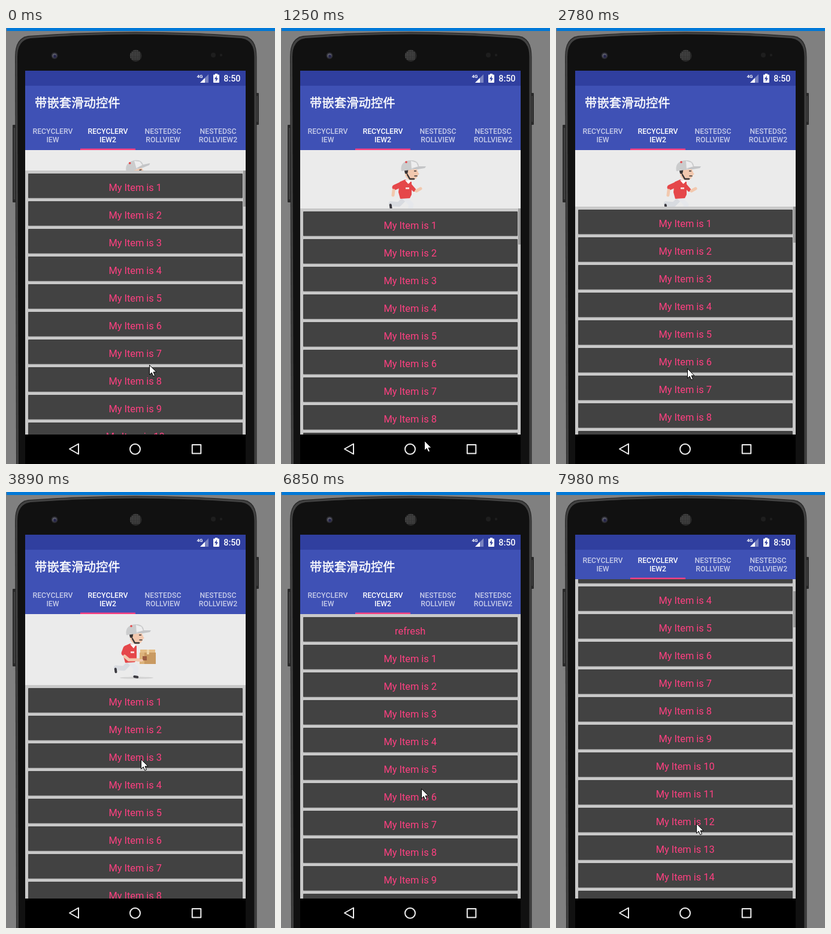
An HTML page with a canvas that plays this animation: 449x725 px, repeating every 8000 ms.

```html
<!DOCTYPE html>
<html lang="zh">
<head>
<meta charset="utf-8">
<title>Pull to refresh</title>
<style>
html, body { margin: 0; width: 100%; height: 100%; overflow: hidden; background: #808080; }
canvas { display: block; }
</style>
</head>
<body>
<canvas id="stage" width="449" height="725"></canvas>
<script>
const g = document.getElementById('stage').getContext('2d');
const LOOP = 8000, TICK = 137.2, LEAD = 29;
const LEFT = 32, WIDTH = 368, MID = 216, BAR = 96, NAV = 676, PITCH = 46;
const PINK = '#ff4081', INDIGO = '#3f51b5', SKIN = '#f2c8ae', RED = '#e5474a';
const SANS = 'Roboto, "Noto Sans", sans-serif';

// Progress of step n between a and b: linear, smooth and slowing down
const ramp = (n, a, b) => Math.min(1, Math.max(0, (n - a) / (b - a)));
const glide = (n, a, b) => { const u = ramp(n, a, b); return u * u * (3 - 2 * u); };
const settle = (n, a, b) => 1 - (1 - ramp(n, a, b)) ** 2;

// Two pulls, a refresh, then a swipe that folds the bar and flings the list
function pose(n) {
  const first = 126 * ramp(n, 0, 8.4), second = 248 * ramp(n, 15.3, 21.5);
  return {
    x: 239 - 20 * glide(n, 9, 13) + 6 * glide(n, 22, 25) + 7 * glide(n, 28, 32) + 2 * glide(n, 40, 50),
    y: 560 + first - 308 * glide(n, 9, 13) + second - 182 * glide(n, 22, 25) + 49 * glide(n, 40, 50)
      + 110 * glide(n, 50, 51.2) - 150 * ramp(n, 51.2, 53.5) + 98 * glide(n, 54, 58),
    pull: (34 + first / 2) * (1 - settle(n, 9, 12.5))
      + (second / 2 - 6 * glide(n, 22, 23.5)) * (1 - settle(n, 37.4, 41)),
    fold: 58 * ramp(n, 51.2, 52.5),
    scroll: 177 * settle(n, 52.5, 58),
    thumb: 1 - ramp(n, 22, 25) + ramp(n, 51, 52),
    running: n > 21 && n < 41,
    refreshed: n > 37
  };
}

function rect(x, y, w, h, color) {
  g.fillStyle = color;
  g.fillRect(x, y, w, h);
}

function round(x, y, w, h, r, color) {
  g.fillStyle = color;
  g.beginPath();
  g.roundRect(x, y, w, h, r);
  g.fill();
}

function disc(x, y, rx, color, ry = rx) {
  g.fillStyle = color;
  g.beginPath();
  g.ellipse(x, y, rx, ry, 0, 0, 7);
  g.fill();
}

function trace(pts) {
  g.beginPath();
  for (let i = 0; i < pts.length; i += 2) g.lineTo(pts[i], pts[i + 1]);
}

function poly(color, ...pts) {
  trace(pts);
  g.closePath();
  g.fillStyle = color;
  g.fill();
}

function limb(color, width, ...pts) {
  trace(pts);
  g.strokeStyle = color;
  g.lineWidth = width;
  g.lineCap = g.lineJoin = 'round';
  g.stroke();
}

function text(s, x, y, font, color, align = 'center') {
  g.font = font;
  g.fillStyle = color;
  g.textAlign = align;
  g.fillText(s, x, y);
}

function clipped(y, h, paint) {
  g.save();
  g.beginPath();
  g.rect(LEFT, y, WIDTH, h);
  g.clip();
  paint();
  g.restore();
}

function shell(inset, color) {
  const l = 15 + inset, r = 418.5 - inset, top = 7 + inset;
  g.beginPath();
  g.moveTo(l + 2, 740);
  g.lineTo(l, 48);
  g.quadraticCurveTo(l, top + 9, l + 22, top + 6);
  g.quadraticCurveTo(MID, top - 7, r - 22, top + 6);
  g.quadraticCurveTo(r, top + 9, r, 48);
  g.lineTo(r, 740);
  g.closePath();
  g.fillStyle = color;
  g.fill();
}

function sideKey(x, y, h) {
  round(x, y, 6, h, 1, '#292929');
  rect(x + 2, y + 5, 2, h - 10, '#444');
}

function phone() {
  rect(0, 0, 449, 725, '#808080');
  rect(1, 0, 448, 5, '#0078d7');
  sideKey(11, 161, 129);
  sideKey(416, 108, 53);
  shell(0, '#2a2a2a');
  shell(1.2, '#424242');
  shell(4, '#111');
  disc(81, 46, 5.5, '#2c2c32');
  disc(81, 46, 3.6, '#5c5d6a');
  disc(81.5, 47, 2.5, '#25254a');
  disc(216.5, 46, 10, '#2b2b2b');
  for (let y = -8; y <= 8; y += 2.7)
    for (let x = -8; x <= 8; x += 2.7)
      if (Math.hypot(x, y) < 9.3) disc(216.5 + x, 46 + y, 0.8, '#6a6a6a');
  disc(346, 45, 4, '#1e1e1e');
  disc(359, 45, 2.2, '#1e1e1e');
}

function statusBar() {
  rect(LEFT, 71, WIDTH, 25, '#303f9f');
  text('4G', 323.5, 83, `700 8px ${SANS}`, '#fff');
  poly('rgba(255,255,255,.35)', 324, 91, 338, 91, 338, 77);
  poly('#fff', 324, 91, 332, 91, 332, 83);
  round(346, 77.5, 10, 13.5, 1, '#fff');
  rect(349, 76, 4, 2, '#fff');
  poly('#303f9f', 352, 79, 348, 85, 350.5, 85, 350, 89.5, 354, 83.5, 351.5, 83.5);
  text('8:50', 391.5, 89, `500 14.3px ${SANS}`, '#fff', 'right');
}

function appBar(fold) {
  const title = '带嵌套滑动控件', y = 132 - fold;
  rect(LEFT, BAR, WIDTH, 107 - fold, INDIGO);
  text(title, 48, y, '500 20.4px "Noto Sans CJK SC", "Noto Sans CJK", sans-serif', '#fff', 'left');
  g.strokeStyle = '#fff';
  g.lineWidth = 0.45;
  g.strokeText(title, 48, y);
  rect(LEFT, 154 - fold, WIDTH, 49, INDIGO);
  ['RECYCLERV IEW', 'RECYCLERV IEW2', 'NESTEDSC ROLLVIEW', 'NESTEDSC ROLLVIEW2'].forEach((tab, i) =>
    tab.split(' ').forEach((s, j) =>
      text(s, 78 + 92 * i, 175.5 + 14 * j - fold, `500 12.27px ${SANS}`,
        i === 1 ? '#fff' : 'rgba(255,255,255,.7)')));
  rect(124, 200.5 - fold, 92, 2.5, PINK);
}

function head(tilt) {
  g.save();
  g.translate(216, 235);
  g.rotate(tilt);
  disc(2, 7, 11, SKIN, 11);
  poly(SKIN, 11, 3, 15, 8, 11, 10);
  poly('#393536', -11, -2, -3, -2, -5, 8, -9, 7);
  limb('#393536', 2.5, -5, 9, -1, 16, 6, 16);
  limb('#393536', 1.5, 7, 11, 11, 11);
  rect(6, 2, 4, 1.5, '#393536');
  g.fillStyle = '#cbcccd';
  g.beginPath();
  g.moveTo(-15, 3);
  g.bezierCurveTo(-18, -10, -8, -15, 1, -15);
  g.bezierCurveTo(13, -15, 15, -7, 14, -1);
  g.closePath();
  g.fill();
  poly('#ededee', 1, -14, 10, -11, 14, -2, 2, 0);
  poly('#c4c5c7', 0, -1, 14, -5, 26, -5, 24, -2, 12, 0);
  disc(-7, -12, 1.8, RED);
  g.restore();
}

function leg(phase, color) {
  const s = Math.cos(phase), thigh = 0.55 * s, shin = 0.75 * s - 0.9;
  const kx = 207 + 4 * s + 12 * Math.sin(thigh), ky = 283 + 12 * Math.cos(thigh);
  const fx = kx + 13 * Math.sin(shin), fy = ky + 12 * Math.cos(shin);
  limb(color, 8, 207, 283, kx, ky, fx, fy);
  limb('#3b3a40', 4, fx - 1, fy + 2, fx + 4 * Math.cos(shin), fy + 2 - 5 * Math.sin(shin));
}

function runner(step, running, tilt) {
  const phase = running ? step * Math.PI / 2 : 0, lift = Math.abs(Math.sin(phase));
  disc(218, 309, 28 - 4 * lift, '#d2d2d2', 1.7);
  g.save();
  g.translate(0, -4 * lift);
  leg(phase + Math.PI, '#d8dbe0');
  leg(phase, '#e6e8ec');
  poly(RED, 198, 256, 207, 252, 218, 256, 218, 277, 215, 283, 199, 284, 196, 273);
  poly('#fff', 207, 253, 217, 254, 213, 260);
  rect(208, 265, 6, 3, '#f7d6d4');
  if (running) {
    limb(RED, 9, 200, 260, 197, 268);
    limb(SKIN, 5, 198, 273, 205, 279, 224, 279);
    rect(224, 262, 25, 6, '#e5bd86');
    rect(223, 267, 27, 19, '#c99a62');
    rect(223, 267, 8, 19, '#dcb27a');
    rect(235, 262, 4, 8, '#f0d6a9');
    rect(228, 273, 7, 7, '#9c5b40');
    limb(SKIN, 4, 220, 280, 227, 280);
  } else {
    limb(RED, 9, 201, 260, 190, 265);
    limb(SKIN, 5, 188, 270, 187, 278);
    limb(RED, 6, 215, 261, 222, 269);
    limb(SKIN, 5, 226, 271, 233, 267);
  }
  head(tilt);
  g.restore();
}

function list(top, p) {
  rect(LEFT, top, WIDTH, NAV - top, '#c9c9c9');
  for (let i = 0; i < 20; i++) {
    const y = top + 5 + PITCH * i - p.scroll, n = p.refreshed ? i : i + 1;
    round(37, y + 1, 358, 40.7, 1, '#b0b0b0');
    round(37, y, 358, 40.7, 1, '#424242');
    text(n ? 'My Item is ' + n : 'refresh', 215.7, y + 29, `400 16.36px ${SANS}`, PINK);
  }
  g.globalAlpha = p.thumb;
  rect(396, top + p.scroll * 0.113, 4, 60, '#979797');
}

function navBar() {
  rect(LEFT, NAV, WIDTH, 49, '#000');
  g.strokeStyle = '#eee';
  g.lineWidth = 2;
  g.lineJoin = 'round';
  trace([106, 700, 121, 691.5, 121, 708.5]);
  g.closePath();
  g.stroke();
  g.beginPath();
  g.arc(215.5, 700.3, 8.5, 0, 7);
  g.stroke();
  g.strokeRect(310.8, 693, 14.5, 14.5);
}

function arrow(x, y) {
  g.save();
  g.translate(x + 0.5, y + 0.5);
  poly('#fff', 0, 0, 0, 16, 3.7, 12.6, 6.3, 18.5, 9, 17.3, 6.5, 11.6, 11.5, 11.6);
  g.strokeStyle = '#000';
  g.lineWidth = 1;
  g.lineJoin = 'miter';
  g.stroke();
  g.restore();
}

function draw(step) {
  const p = pose(step), bar = 203 - p.fold, top = bar + p.pull;
  phone();
  rect(LEFT, bar, WIDTH, p.pull, '#ebebeb');
  clipped(bar, p.pull, () => runner(step, p.running, -0.4 * (1 - ramp(p.pull, 0, 71))));
  clipped(top, NAV - top, () => list(top, p));
  clipped(BAR, bar - BAR, () => appBar(p.fold));
  statusBar();
  navBar();
  arrow(p.x, p.y);
}

function frame(now) {
  draw(Math.floor((now % LOOP + LEAD) / TICK));
  requestAnimationFrame(frame);
}
requestAnimationFrame(frame);
</script>
</body>
</html>
```
